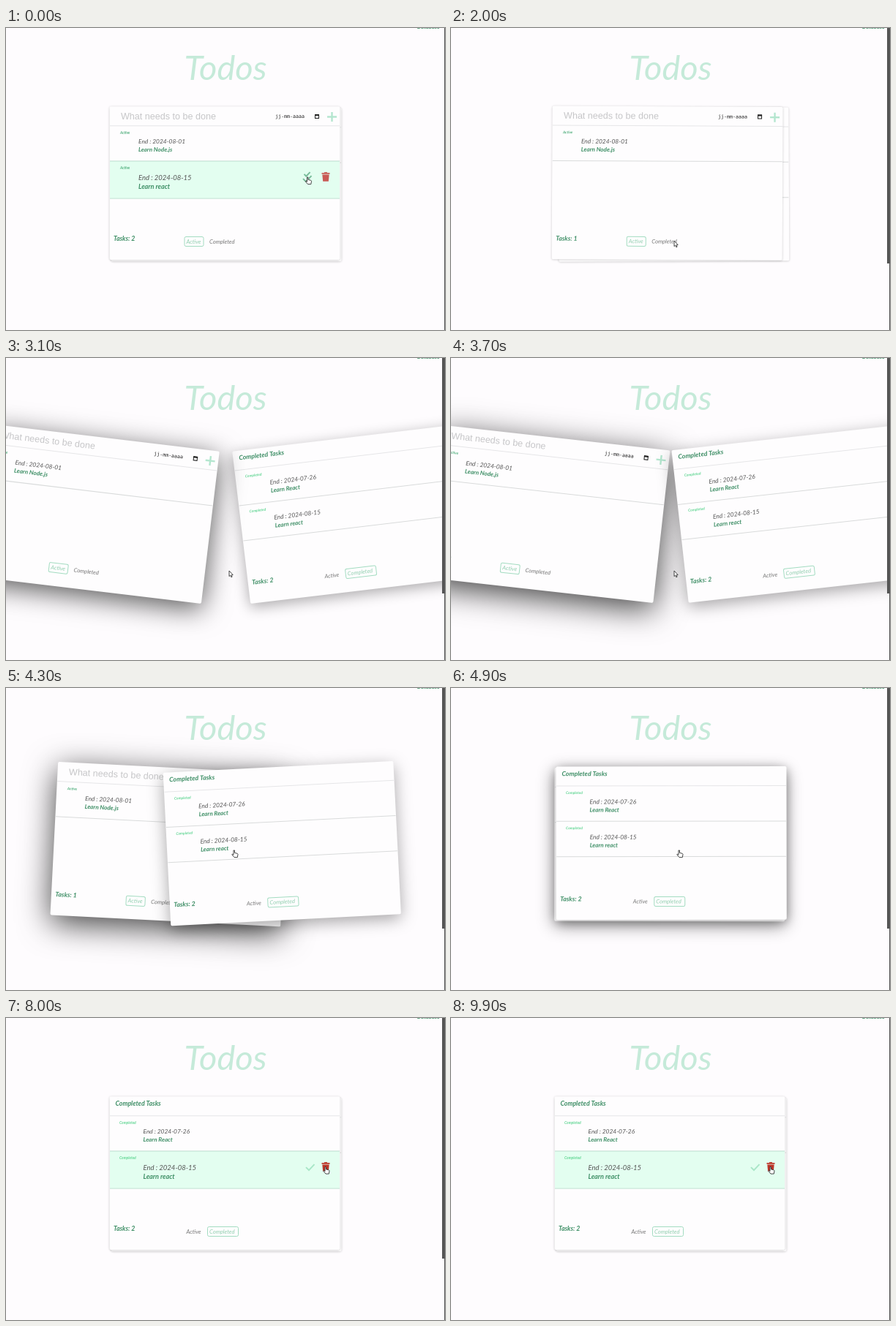
Recreate the animation shown at these times as an HTML page with a canvas. Size 600 by 413 pixels, loop 10000 ms.

```html
<!DOCTYPE html>
<html lang="en">
<head>
<meta charset="utf-8">
<title>Todos</title>
<style>
html, body { margin: 0; width: 100%; height: 100%; overflow: hidden; background: #fefcfe; }
canvas { display: block; }
</style>
</head>
<body>
<canvas id="stage" width="600" height="413"></canvas>
<script>
const ctx = document.getElementById('stage').getContext('2d');
const LOOP = 10000, CX = 299, CY = 212.5;
const GREEN = '#3d8e65', MINT = '#b4e6cf', GRAY = '#777';

const seg = (t, a, b) => Math.min(1, Math.max(0, (t - a) / (b - a)));
const smooth = u => u * u * (3 - 2 * u);
const mix = (a, b, u) => a + (b - a) * u;

function text(str, x, y, size, color, weight = 400, align = 'left') {
  ctx.font = `italic ${weight} ${size}px Lato, sans-serif`;
  ctx.fillStyle = color;
  ctx.textAlign = align;
  ctx.fillText(str, x, y);
}

function plain(str, x, y, font, color) {
  ctx.font = font;
  ctx.fillStyle = color;
  ctx.textAlign = 'left';
  ctx.fillText(str, x, y);
}

function rect(x, y, w, h, color) {
  ctx.fillStyle = color;
  ctx.fillRect(x, y, w, h);
}

function line(points, color, width) {
  ctx.beginPath();
  points.forEach(([x, y]) => ctx.lineTo(x, y));
  ctx.strokeStyle = color;
  ctx.lineWidth = width;
  ctx.stroke();
}

function box(x, y, w, h, r) {
  ctx.beginPath();
  ctx.roundRect(x, y, w, h, r);
}

function check(x, y, color, size = 1) {
  line([[x, y + 4 * size], [x + 4 * size, y + 8 * size], [x + 11.5 * size, y]], color, 2);
}

function trash(x, y, color) {
  rect(x, y + 1, 11, 1.7, color);
  rect(x + 3.5, y, 4, 1.5, color);
  ctx.beginPath();
  ctx.moveTo(x + 0.8, y + 3.5);
  ctx.lineTo(x + 10.2, y + 3.5);
  ctx.lineTo(x + 9.3, y + 12.6);
  ctx.lineTo(x + 1.7, y + 12.6);
  ctx.fill();
}

// Hovering a row tints it, enlarges its text and reveals its icons.
function row(item, top, { hover, icons, pressed }, done) {
  const height = mix(48.3, 51, hover);
  const x = done ? 187.5 : 181;
  if (hover) {
    ctx.globalAlpha = hover;
    rect(142, top, 314, height, '#e3fef0');
    line([[142, top], [456, top]], '#c2e6d5', 1);
    ctx.globalAlpha = 1;
  }
  line([[142, top + height], [456, top + height]], hover > 0.5 ? '#c2e0d2' : '#d9dbdb', 1);
  text(done ? 'Completed' : 'Active', done ? 155 : 156, top + 11, 5, done ? '#62d694' : '#4fae7c', 700);
  text('End : ' + item.date, x, top + mix(24.5, 25.5, hover), mix(8.4, 9.5, hover), '#555');
  text(item.name, x, top + mix(35.5, 37.7, hover), mix(8.1, 9.1, hover), GREEN, 700);
  if (icons) {
    ctx.globalAlpha = icons;
    if (done) {
      check(410, top + 18, '#a9e6c8');
    } else {
      check(407.5, top + 15, '#79bd9b', 0.7);
      check(406, top + 20, '#79bd9b');
    }
    trash(431.5, top + 15, pressed ? '#bd3528' : '#c95a55');
    ctx.globalAlpha = 1;
  }
  return top + height;
}

function tab(label, x, selected) {
  const width = label === 'Active' ? 26 : 42;
  if (selected) {
    box(x - 2.5, 285.5, width, 13, 2);
    ctx.strokeStyle = '#a3dcc1';
    ctx.lineWidth = 1;
    ctx.stroke();
  }
  text(label, x, 294.5, 7.7, selected ? '#90cfaf' : GRAY);
}

function inputBar() {
  plain('What needs to be done', 157, 124.5, '12.57px "Liberation Sans", sans-serif', '#c6c6c8');
  plain('jj-mm-aaaa', 368, 123, '6.65px "DejaVu Sans Mono", monospace', '#222');
  ctx.strokeStyle = '#222';
  ctx.lineWidth = 1;
  ctx.strokeRect(422.5, 118.5, 5, 5);
  rect(422, 118, 6, 2, '#222');
  line([[439, 121.5], [452, 121.5]], MINT, 2.4);
  line([[445.5, 115], [445.5, 128]], MINT, 2.4);
}

function card({ done, items, states, shadow }, pose) {
  ctx.save();
  ctx.translate(CX + pose.x, CY + pose.y);
  ctx.rotate(pose.angle * Math.PI / 180);
  ctx.translate(-CX, -CY);

  ctx.save();
  ctx.shadowColor = `rgba(0,0,0,${mix(0.22, shadow.alpha, pose.lift)})`;
  ctx.shadowBlur = mix(3, shadow.blur, pose.lift);
  ctx.shadowOffsetY = mix(0.5, shadow.drop, pose.lift);
  box(141.5, 107.3, 315, 209.7, 2);
  ctx.fillStyle = '#fefdfe';
  ctx.fill();
  ctx.restore();

  if (done) text('Completed Tasks', 149.5, 120, 8.8, GREEN, 700);
  else inputBar();
  line([[142, 133.8], [456, 133.8]], '#e6e6e8', 1);
  let top = 133.8;
  items.forEach((item, i) => top = row(item, top, states[i], done));
  text('Tasks: ' + items.length, 147, 291.3, 8.8, GREEN, 700);
  tab('Active', 246.5, !done);
  tab('Completed', 278, done);
  ctx.restore();
}

const NODE = { name: 'Learn Node.js', date: '2024-08-01' };
const FIRST = { name: 'Learn React', date: '2024-07-26' };
const SECOND = { name: 'Learn react', date: '2024-08-15' };
const IDLE = { hover: 0, icons: 0 };

// The two cards fan apart, swap depth and slide back together.
const SWAP = 3450, SPREAD = 182, TILT = 6.84;
function fan(t) {
  if (t < SWAP) {
    const rest = 1 - seg(t, 1990, 3400);
    return { x: 1 - rest ** 2.4, angle: 1 - rest ** 5 };
  }
  const back = 1 - smooth(seg(t, SWAP, 5000));
  return { x: back, angle: back };
}

// Cursor stops: time, x, y
const STOPS = [
  [0, 412.5, 204], [850, 412.5, 204], [1300, 305, 291], [3750, 305, 291],
  [4200, 312, 222], [5250, 312, 222], [5650, 340, 158], [6450, 340, 158],
  [7100, 437, 203.5], [LOOP, 437, 203.5]
];

function cursor(t) {
  const i = STOPS.findIndex(s => s[0] > t);
  const [a, b] = [STOPS[i - 1], STOPS[i]];
  const u = smooth(seg(t, a[0], b[0]));
  const hand = t < 100 || (t > 1250 && t < 2000) || t > 4050;
  ctx.save();
  ctx.translate(mix(a[1], b[1], u), mix(a[2], b[2], u));
  ctx.beginPath();
  const shape = hand
    ? [[-1, 0], [0.4, 0], [0.6, 3.5], [4.2, 4.3], [5, 5.3], [4.3, 9.6], [0, 9.6], [-3.2, 5.8], [-2.6, 5], [-1, 6.2]]
    : [[0, 0], [0, 7.6], [1.7, 6.2], [2.9, 8.8], [4.1, 8.2], [3, 5.8], [5.2, 5.6]];
  shape.forEach(([x, y]) => ctx.lineTo(x, y));
  ctx.closePath();
  ctx.fillStyle = '#fff';
  ctx.fill();
  ctx.strokeStyle = '#333';
  ctx.lineWidth = 0.9;
  ctx.stroke();
  ctx.restore();
}

function draw(t) {
  rect(0, 0, 600, 413, '#fefcfe');
  text('Todos', 300, 70.5, 47, '#c5ead9', 400, 'center');
  text('Database', 562, 1.3, 7.6, GREEN, 700);

  const ticked = t >= 100;
  const { x, angle } = fan(t);
  const lift = t < 4300 ? smooth(seg(t, 1990, 3500)) : 1 - smooth(seg(t, 4300, 5500));
  const pose = (side, back) => {
    const gap = back ? 2 * (1 - x) : 0;
    return { x: (side * SPREAD + 1.5) * x + gap, y: x + gap, angle: -side * TILT * angle, lift };
  };

  const fade = (start, end, time) => smooth(seg(t, start, start + time)) * (1 - smooth(seg(t, end, end + time)));
  const over = (start, end) => ({ hover: fade(start, end, 250), icons: fade(start, end, 800) });
  const before = over(4900, 5400), after = over(6750, LOOP);
  const active = {
    done: false,
    shadow: { alpha: 0.75, blur: 44, drop: 10 },
    items: ticked ? [NODE] : [NODE, SECOND],
    states: [IDLE, { hover: 1, icons: 1 }]
  };
  const completed = {
    done: true,
    shadow: { alpha: 0.35, blur: 22, drop: 6 },
    items: ticked ? [FIRST, SECOND] : [FIRST],
    states: [over(5350, 6750), {
      hover: Math.max(before.hover, after.hover),
      icons: Math.max(before.icons, after.icons),
      pressed: t > 7000
    }]
  };

  const swapped = t >= SWAP;
  const left = () => card(active, pose(-1, swapped));
  const right = () => card(completed, pose(1, !swapped));
  (swapped ? [left, right] : [right, left]).forEach(paint => paint());

  rect(599, 0, 1, 413, '#555');
  if (t >= 2000 && t < 9000) rect(596, 0, 4, t < 3900 ? 322 : 329, '#555');
  cursor(t);
}

function tick() {
  draw(performance.now() % LOOP);
  requestAnimationFrame(tick);
}
tick();
</script>
</body>
</html>
```
